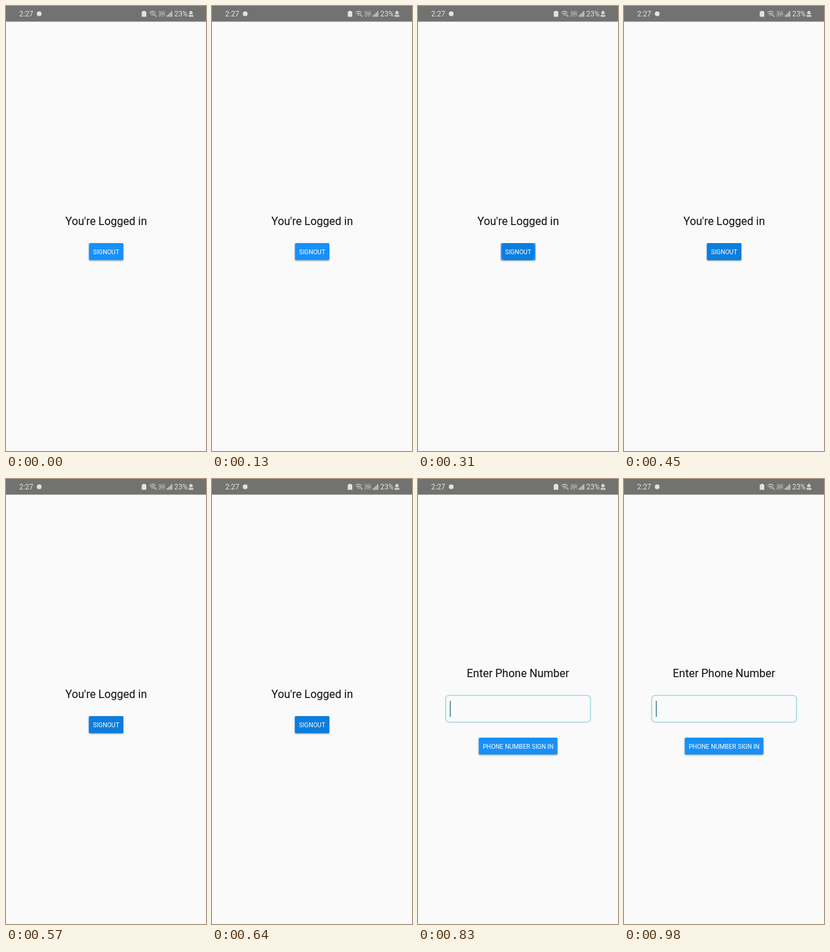
An HTML page that plays this animation: 288x640 px, repeating every 1000 ms.

```html
<!DOCTYPE html>
<html lang="en">
<head>
<meta charset="utf-8">
<title>Sign out</title>
<style>
  html, body { margin: 0; width: 100%; height: 100%; overflow: hidden; background: #fafafa; }
  svg { display: block; width: 288px; height: 640px; font-family: Roboto, sans-serif; }
  .title { font-size: 16px; fill: #0b0b0b; text-anchor: middle; }
  .label { font-size: 9px; fill: #fff; text-anchor: middle; }
  .button { fill: #1890f8; filter: drop-shadow(0 1px 1px #0005); }
  .line { fill: none; stroke: #e2e2e0; }
</style>
</head>
<body>
<svg viewBox="0 0 288 640">
  <defs><clipPath id="clip"><rect x="119.5" y="341" width="49.5" height="24.5" rx="1.5"/></clipPath></defs>
  <rect width="288" height="640" fill="#fafafa"/>

  <g fill="#e2e2e0">
    <rect width="288" height="22.5" fill="#727270"/>
    <text x="19" y="15.2" font-size="10.5">2:27</text>
    <circle cx="47.8" cy="11.2" r="3.4"/>
    <path d="M197 7h3.5v1h1.5v7.5h-6.5V8h1.5z"/>
    <path class="line" stroke="#727270" d="M197.2 13.2v-2.4l1.5-1.2 1.5 1.2v2.4M197.2 12h3"/>
    <path class="line" d="M206.5 9.5q4.5-4 9 0M208 11.4q3-2.6 6 0M209.6 13.2q1.4-1.2 2.8 0"/>
    <path d="M213 13.5l1.3-2 1.3 2zM214.5 14l1.3 1.7 1.3-1.7z"/>
    <text x="224.5" y="10.6" font-size="4.8" text-anchor="middle">Vo))</text>
    <text x="224.5" y="15.4" font-size="4.8" text-anchor="middle">LTE1</text>
    <path class="line" stroke-width="1.3" d="M232.3 15.5v-2.3M234.4 15.5v-4M236.5 15.5v-6M238.6 15.5v-8"/>
    <text x="242.3" y="15.2" font-size="10.5">23%</text>
    <path d="M265 7h2.6v1h1v4h-4.6V8h1zM263 13h6.8v2.5H263z" opacity=".85"/>
  </g>

  <g id="home">
    <text class="title" x="144.3" y="315">You're Logged in</text>
    <rect class="button" x="119.5" y="341" width="49.5" height="24.5" rx="1.5"/>
    <circle id="ripple" cx="144" cy="353" fill="#0d7ddb" clip-path="url(#clip)"/>
    <text class="label" x="144.2" y="356.7">SIGNOUT</text>
  </g>

  <g id="login">
    <text class="title" x="144" y="284.5">Enter Phone Number</text>
    <rect x="39.8" y="311.3" width="208.6" height="38.4" rx="5" fill="none" stroke="#a9d9e5" stroke-width="1.6"/>
    <path d="M46.5 319v23" stroke="#35777a" stroke-width="1.3"/>
    <rect class="button" x="87.5" y="372" width="113.3" height="24.3" rx="1.5"/>
    <text class="label" x="144.2" y="387.6">PHONE NUMBER SIGN IN</text>
  </g>
</svg>
<script>
  const get = id => document.getElementById(id);
  const home = get('home'), login = get('login'), ripple = get('ripple');
  const ramp = (t, from, to) => Math.min(1, Math.max(0, (t - from) / (to - from)));

  function draw(now) {
    const t = now % 1000;
    const loggedIn = t < 670;
    home.style.display = loggedIn ? '' : 'none';
    login.style.display = loggedIn ? 'none' : '';
    const grow = 1 - (1 - ramp(t, 190, 420)) ** 2;
    ripple.setAttribute('r', 6 + 23 * grow);
    ripple.setAttribute('opacity', ramp(t, 190, 270));
    requestAnimationFrame(draw);
  }
  requestAnimationFrame(draw);
</script>
</body>
</html>
```
